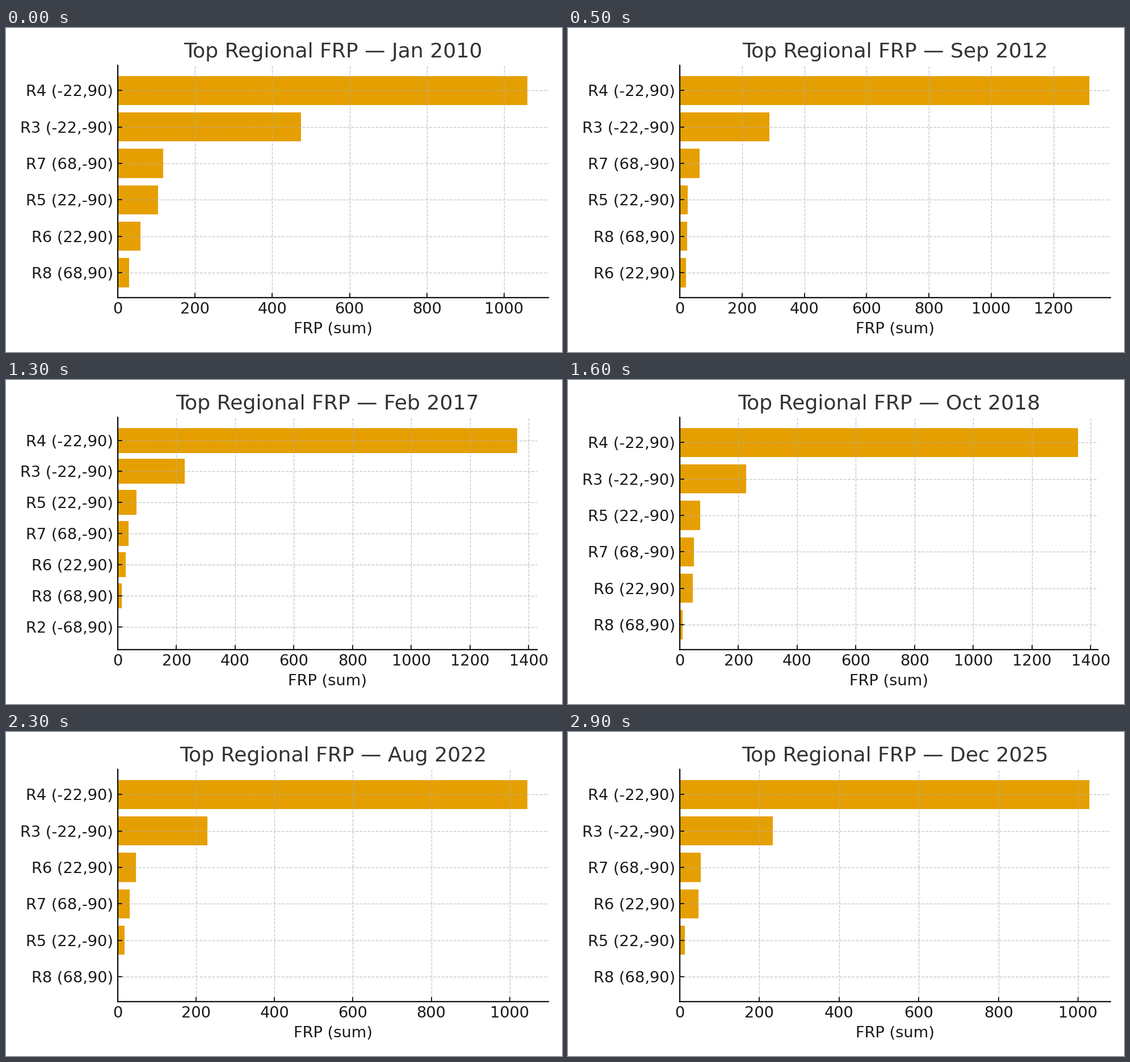
A matplotlib script for the animation above (3 s loop, 980 by 572 pixels).

```python
import numpy as np
import matplotlib.pyplot as plt
from matplotlib.animation import FuncAnimation
from matplotlib.ticker import MultipleLocator

W, H, DPI = 980, 572, 163.34
FRAMES, INTERVAL = 30, 100
MONTHS = "Jan Feb Mar Apr May Jun Jul Aug Sep Oct Nov Dec".split()
AMBER, INK, EDGE = "#E69F00", "#1a1a1a", "#111111"

plt.rcParams.update({
    "font.family": "DejaVu Sans", "font.size": 10,
    "axes.titlesize": 16, "axes.titlecolor": "#333333",
    "axes.labelsize": 12, "axes.labelcolor": INK,
    "axes.linewidth": 1.0, "axes.edgecolor": EDGE,
    "axes.axisbelow": "line",
    "grid.color": "#b0b0b0", "grid.linestyle": "--",
    "grid.linewidth": 0.6, "grid.alpha": 0.7,
})
for axis in ("xtick", "ytick"):
    plt.rc(axis, direction="in", labelsize=12, labelcolor=INK, color=EDGE)


def decay(t, span):
    return np.exp(-t / span)


def pulse(t, at, width):
    return np.exp(-((t - at) / width) ** 2)


def lead(t):
    return np.interp(t, [0, 5, 9, 13, 19, 23, 29],
                     [1061, 1316, 1153, 1360, 1353, 1046, 1029])


def sums_at(t):
    """Region sums at step t, smallest first."""
    sums = {
        "R4 (-22,90)": lead(t),
        "R3 (-22,-90)": 205 + t + 269 * decay(t, 4),
        "R7 (68,-90)": 27 + 90 * decay(t, 5) + 25 * pulse(t, 29, 2)
                       + 169 * (pulse(t, 9, 2) + pulse(t, 19, 2)),
        "R5 (22,-90)": 13 + 91 * decay(t, 2.5) + 58 * pulse(t, 15, 5),
        "R6 (22,90)": 10 + 1.3 * t + 49 * decay(t, 2) + 38 * pulse(t, 19, 3),
        "R8 (68,90)": max(0.4, 30 * (1 - t / 23)),
    }
    # The southernmost region reports only now and then.
    if t > 2 and t % 11 in (0, 2):
        sums["R2 (-68,90)"] = 0.2
    return sorted(sums.items(), key=lambda item: item[1])


def date_at(step):
    month = step * 191 // (FRAMES - 1)
    return f"{MONTHS[month % 12]} {2010 + month // 12}"


def draw(step):
    ax.clear()
    names, values = zip(*sums_at(step))
    ax.barh(names, values, height=0.8, color=AMBER)
    ax.set_xlim(0, max(values) * 1.05)
    ax.xaxis.set_major_locator(MultipleLocator(200))
    ax.grid(True)
    ax.spines[["top", "right"]].set_visible(False)
    ax.set_title(f"Top Regional FRP — {date_at(step)}")
    ax.set_xlabel("FRP (sum)")

    # The right edge gives way to the last tick label; the other edges are fixed.
    fig.subplots_adjust(left=0.125, right=0.9, bottom=0.11, top=0.88)
    fig.tight_layout()
    fig.subplots_adjust(left=197 / W, bottom=1 - 476.3 / H, top=1 - 66 / H)
    return []


fig, ax = plt.subplots(figsize=(6, 3.502), dpi=DPI)
anim = FuncAnimation(fig, draw, frames=FRAMES, interval=INTERVAL,
                     init_func=lambda: draw(0), repeat=True, repeat_delay=0)
plt.show()
```
